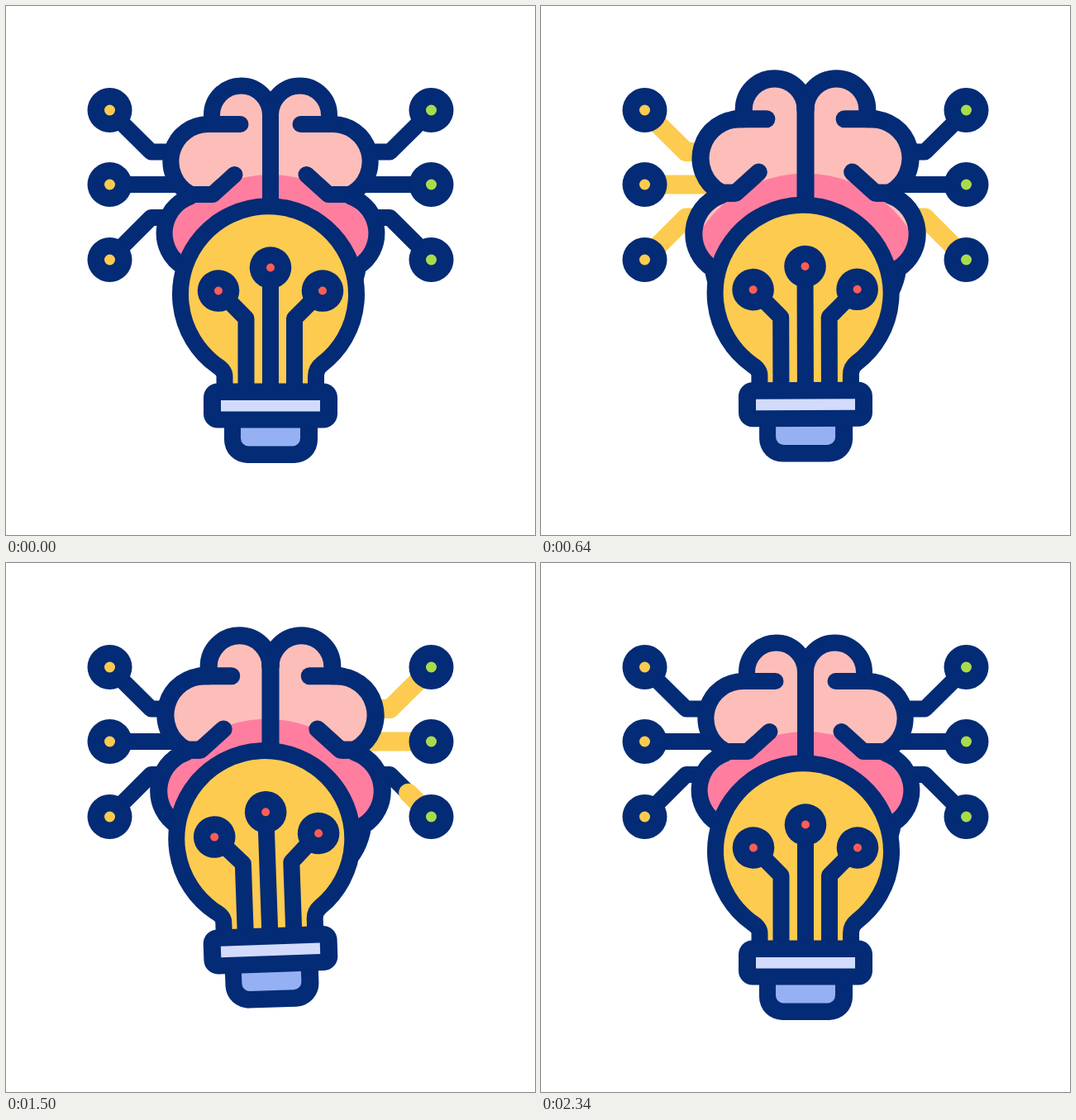
An HTML page without scripts that plays this animation: 640 px wide and 640 px high, repeating every 2400 ms.

```html
<!DOCTYPE html>
<html lang="en">
<head>
<meta charset="utf-8">
<title>Bright idea</title>
<style>
  :root {
    --navy: #042b75;
    --yellow: #fdcb50;
    --smooth: cubic-bezier(.333, 0, .667, 1);
  }
  html, body { margin: 0; width: 100%; height: 100%; overflow: hidden; background: #fff; }
  svg { display: block; width: 100%; height: 100%; }

  .ink, .wire, .pulse { fill: none; stroke-linecap: round; stroke-linejoin: round; }
  .ink, .wire { stroke: var(--navy); stroke-width: 20; }
  .navy { fill: var(--navy); }
  .yellow { fill: var(--yellow); }
  .green { fill: #a8dc4d; }
  .red { fill: #ff5d55; }
  .pink { fill: #fdbeb9; }
  .shade { fill: #ff7ea0; }

  .grow, .mirror { transform-origin: 320px 260px; }
  .mirror { transform: scaleX(-1); }
  .grow { animation: grow 2.4s var(--smooth) infinite; }
  .upper { animation: upper 2.4s var(--smooth) infinite; }
  .lower { animation: lower 2.4s var(--smooth) infinite; }
  .swing {
    transform-origin: 320px 483.5px;
    animation: bob 2.4s var(--smooth) infinite, sway 2.4s var(--smooth) infinite;
  }
  .pulse {
    stroke: var(--yellow);
    stroke-width: 23;
    stroke-dasharray: 100 300;
    animation: 2.4s linear infinite;
  }

  @keyframes grow { 0%, 97.5%, 100% { scale: 1; } 42.5% { scale: 1.077; } }
  @keyframes upper { 0%, 97.5%, 100% { translate: 0 0; } 42.5% { translate: -12px 0; } }
  @keyframes lower { 0%, 97.5%, 100% { translate: 0 0; } 42.5% { translate: -15px 0; } }
  @keyframes bob {
    0%, 90%, 100% { translate: 0 0; }
    11.67% { translate: 0 58px; }
    32.92% { translate: 0 -17px; }
    42.92% { translate: 0 56px; }
    60.83% { translate: 0 -17px; }
    73.33% { translate: 0 16px; }
  }
  @keyframes sway {
    0%, 90%, 100% { rotate: 0deg; }
    18.75% { rotate: -16deg; }
    34.2% { rotate: 14.3deg; }
    55.4% { rotate: -7deg; }
    69.2% { rotate: 2.5deg; }
  }

  /* Each signal enters at the start of its wire and leaves at the end. */
  @keyframes left-low {
    0%, 10% { stroke-dashoffset: 104; }
    14.6%, 42.75% { stroke-dashoffset: 0; }
    51.3%, 100% { stroke-dashoffset: -104; }
  }
  @keyframes left-top {
    0%, 14.4% { stroke-dashoffset: 104; }
    19%, 47.75% { stroke-dashoffset: 0; }
    56.1%, 100% { stroke-dashoffset: -104; }
  }
  @keyframes left-mid {
    0%, 18.8% { stroke-dashoffset: 104; }
    23.4%, 52.75% { stroke-dashoffset: 0; }
    61.1%, 100% { stroke-dashoffset: -104; }
  }
  @keyframes right-low {
    0%, 23.1% { stroke-dashoffset: 104; }
    27.7%, 57.8% { stroke-dashoffset: 0; }
    66.2%, 100% { stroke-dashoffset: -104; }
  }
  @keyframes right-top {
    0%, 27.5% { stroke-dashoffset: 104; }
    32.1%, 62.8% { stroke-dashoffset: 0; }
    71.2%, 100% { stroke-dashoffset: -104; }
  }
  @keyframes right-mid {
    0%, 31.8% { stroke-dashoffset: 104; }
    36.8% { stroke-dashoffset: 0; }
    67.8% { stroke-dashoffset: 0; animation-timing-function: ease-out; }
    81.5%, 100% { stroke-dashoffset: -104; }
  }
</style>
</head>
<body>
<svg viewBox="0 0 640 640">
  <defs>
    <path id="lobes" d="M320 132A35.5 35.5 0 0 0 249 132V143H246A45 45 0 0 0 222 227V231A47 47 0 0 0 214 315C218 345 240 385 320 385"/>
    <path id="upper-fold" d="M247 143H283.5"/>
    <path id="lower-fold" d="M237 228H250L276.500 204"/>
    <clipPath id="brain">
      <use href="#lobes" class="grow"/>
      <use href="#lobes" class="grow" transform="scale(-1 1)"/>
    </clipPath>
    <g id="wires" class="wire">
      <path d="M125.5 127L175.5 176.5H205"/>
      <path d="M125.5 216H210"/>
      <path d="M125.5 306L175.5 256H205"/>
    </g>
    <g id="nodes" class="navy">
      <circle cx="125.5" cy="126" r="27"/>
      <circle cx="125.5" cy="216" r="27"/>
      <circle cx="125.5" cy="307" r="27"/>
    </g>
    <g id="dots">
      <circle cx="125.5" cy="126" r="6.5"/>
      <circle cx="125.5" cy="216" r="6.5"/>
      <circle cx="125.5" cy="307" r="6.5"/>
    </g>
    <g id="contact">
      <circle class="navy" r="25.3"/>
      <circle class="red" r="5"/>
    </g>
  </defs>

  <use href="#wires"/>
  <use href="#wires" class="mirror"/>
  <path class="pulse" pathLength="100" style="animation-name:left-top" d="M125.5 127L175.5 176.5H200"/>
  <path class="pulse" pathLength="100" style="animation-name:left-mid" d="M208 216H125.5"/>
  <path class="pulse" pathLength="100" style="animation-name:left-low" d="M125.5 306L175.5 256H200"/>
  <path class="pulse" pathLength="100" style="animation-name:right-top" d="M440 176.5H464.5L514.5 127"/>
  <path class="pulse" pathLength="100" style="animation-name:right-mid" d="M514.5 216H430"/>
  <path class="pulse" pathLength="100" style="animation-name:right-low" d="M440 256H464.5L514.5 306"/>
  <use href="#nodes"/>
  <use href="#nodes" class="mirror"/>
  <use href="#dots" class="yellow"/>
  <use href="#dots" class="mirror green"/>

  <g clip-path="url(#brain)">
    <rect class="pink" width="640" height="640"/>
    <circle class="shade swing" cx="320" cy="354" r="150"/>
  </g>
  <g class="grow ink">
    <g>
      <use href="#lobes"/>
      <path d="M222 228H237"/>
      <use href="#upper-fold" class="upper"/>
      <use href="#lower-fold" class="lower"/>
    </g>
    <g class="mirror">
      <use href="#lobes"/>
      <path d="M222 228H237"/>
      <use href="#upper-fold" class="upper"/>
      <use href="#lower-fold" class="lower"/>
    </g>
    <path d="M320 124V360"/>
  </g>

  <g class="swing">
    <path class="ink" style="fill:var(--yellow)" d="M264.5 468V448Q264.5 441 255 435A106.5 106.5 0 1 1 382 433.5Q375 439 375 448V468"/>
    <path class="ink" d="M257 344L290.5 378V466M320 316V466M383 344L349 378V466"/>
    <use href="#contact" x="257" y="344.5"/>
    <use href="#contact" x="320" y="316.5"/>
    <use href="#contact" x="383" y="344.5"/>
    <path class="navy" d="M264 500H377V525A28 28 0 0 1 349 553H292A28 28 0 0 1 264 525Z"/>
    <path fill="#95b1f3" d="M284 508H356V523A9.5 9.5 0 0 1 346.5 532.5H293.5A9.5 9.5 0 0 1 284 523Z"/>
    <rect class="navy" x="239" y="456.5" width="162" height="54" rx="17"/>
    <rect fill="#d2dbfb" x="260" y="477" width="120" height="13.5"/>
  </g>
</svg>
</body>
</html>
```
